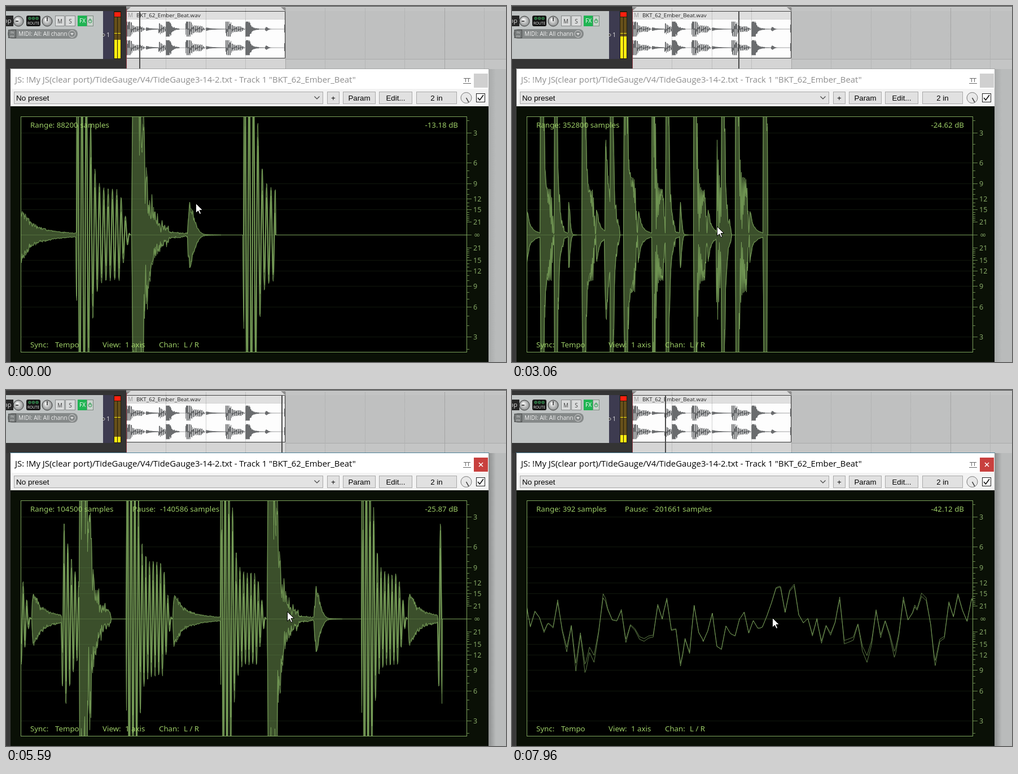
An HTML page with a canvas that plays this animation: 886x632 px, repeating every 8 s.

```html
<!DOCTYPE html>
<html lang="en">
<head>
<meta charset="utf-8">
<title>Waveform scope</title>
<style>
html, body { margin: 0; width: 100%; height: 100%; overflow: hidden; background: #bfc0c0; }
canvas { display: block; width: 886px; height: 632px; }
</style>
</head>
<body>
<canvas id="stage" width="886" height="632"></canvas>
<script>
const g = document.getElementById('stage').getContext('2d');
const TAU = Math.PI * 2;
const LOOP = 88200, BEAT = LOOP / 8;
const PAUSE_AT = 4150, PAUSE_END = 239398;
const CLIP = { name: 'BKT_62_Ember_Beat', x: 213, w: 282 };
const PLOT = { x: 26, y: 196, w: 790, h: 419, mid: 406, full: 255.4 };
const SANS = '"Noto Sans", sans-serif', UI = '"Open Sans", sans-serif', ARIAL = '"Liberation Sans", sans-serif';
const LINE = '#7ca45c', GREEN = '#9ccc66', SCALE = '#86a866', TICK = '#66854b';

// ---------- helpers ----------
const clamp = (v, a, b) => Math.max(a, Math.min(b, v));
const mix = (a, b, p) => a + (b - a) * p;

function rng(seed) {
  return () => {
    seed = (seed + 0x6D2B79F5) | 0;
    let r = Math.imul(seed ^ (seed >>> 15), 1 | seed);
    r = (r + Math.imul(r ^ (r >>> 7), 61 | r)) ^ r;
    return ((r ^ (r >>> 14)) >>> 0) / 4294967296;
  };
}

// Keys on both sides of time t, and the progress between them
function between(keys, t) {
  const next = keys.findIndex(k => t <= k.t);
  const i = next < 0 ? keys.length - 1 : next;
  const b = keys[i], a = keys[Math.max(0, i - 1)];
  return { a, b, p: b.t > a.t ? clamp((t - a.t) / (b.t - a.t), 0, 1) : 1 };
}

function rect(x, y, w, h, fill) {
  g.fillStyle = fill;
  g.fillRect(x, y, w, h);
}

function box(x, y, w, h, fill, stroke) {
  rect(x, y, w, h, fill);
  g.strokeStyle = stroke;
  g.lineWidth = 1;
  g.strokeRect(x + .5, y + .5, w - 1, h - 1);
}

function pill(x, y, w, h, r, fill) {
  g.beginPath();
  g.roundRect(x, y, w, h, r);
  g.fillStyle = fill;
  g.fill();
}

function text(s, x, y, size, fill, font = SANS, align = 'left') {
  g.font = size + 'px ' + font;
  g.textAlign = align;
  g.fillStyle = fill;
  g.fillText(s, x, y);
}

function path(points, stroke, width = 1, fill) {
  g.beginPath();
  for (let i = 0; i < points.length; i += 2) g.lineTo(points[i], points[i + 1]);
  if (fill) { g.closePath(); g.fillStyle = fill; g.fill(); }
  if (stroke) { g.strokeStyle = stroke; g.lineWidth = width; g.stroke(); }
}

function disc(x, y, r, fill, stroke) {
  g.beginPath();
  g.arc(x, y, r, 0, TAU);
  if (fill) { g.fillStyle = fill; g.fill(); }
  if (stroke) { g.strokeStyle = stroke; g.lineWidth = 1; g.stroke(); }
}

// ---------- drum loop, amplitudes in scope pixels ----------
const rand = rng(41);

// Random knots joined by lines, one every `step` samples
function noise(step, lo, hi) {
  const knots = Array.from({ length: LOOP / step + 2 }, () => mix(lo, hi, rand()));
  return i => {
    const k = Math.floor(i / step);
    return mix(knots[k], knots[k + 1], i / step - k);
  };
}

const hiss = noise(4, -1, 1), rumble = noise(17, -1, 1), swell = noise(60, .5, 1.2);
const left = new Float32Array(LOOP), right = new Float32Array(LOOP);

function add(start, len, fn) {
  for (let n = 0; n < len && start + n < LOOP; n++) left[start + n] += fn(n, start + n);
}

function kick(start, tail) {
  add(start, BEAT, (n, i) => {
    const fade = clamp((10600 - n) / 2100, 0, 1);
    const amp = tail * fade + 270 / (1 + (n / 2700) ** 6);
    return amp * Math.sin(TAU * n / 861 - .25) + (130 * Math.exp(-n / 700) + 6 * fade) * hiss(i);
  });
}

function snare(start, end) {
  add(start, end, (n, i) => {
    const amp = 350 / (1 + (n / 2450) ** 4) + (n < 7200 ? 10 : 3);
    const tone = .25 * Math.sin(TAU * n / 137);
    return amp * (tone + swell(i) * (.6 * rumble(i) + .65 * hiss(i)));
  });
}

function hat(start, len) {
  add(start, len, (n, i) => {
    const amp = 38 * Math.exp(-n / 1600) + 20 * Math.exp(-n / 6500);
    return amp * Math.min(1, .5 + n / 300) * hiss(i) * mix(1, swell(i), .4);
  });
}

function shortHat(start) {
  add(start, 6500, (n, i) => {
    const amp = 62 * Math.exp(-((n / 1550) ** 2)) + 3 * Math.exp(-n / 2500);
    return amp * Math.min(1, .5 + n / 800) * hiss(i) * mix(1, swell(i), .4);
  });
}

function tom(start) {
  add(start, 4300, n => 205 * Math.exp(-n / 3700) * Math.min(1, n / 500) * Math.cos(TAU * (n - 722) / 861));
}

hat(0, BEAT);
kick(BEAT, 75);
snare(BEAT * 2, BEAT);
shortHat(BEAT * 3);
kick(BEAT * 4, 75);
hat(BEAT * 5, 6725);
tom(61850);
snare(BEAT * 6, 7400);
kick(BEAT * 7, 95);
for (let i = 0; i < LOOP; i++) right[i] = left[i] * (.92 + .08 * Math.sin(i / 40));

// ---------- state over time ----------
const LATE = [23, 35, 37, 43];
const ticks = [0];
for (let k = 1; k <= 44; k++) ticks.push(ticks[k - 1] + (LATE.includes(k) ? 190 : 180));

const ZOOM = [
  { t: 5050, r: 352800, l: 0 },
  { t: 5590, r: 104500, l: 140586 },
  { t: 6130, r: 19882, l: 191079 },
  { t: 6500, r: 19882, l: 191079 },
  { t: 7050, r: 5430, l: 198914 },
  { t: 7960, r: 392, l: 201661 }
];
const MOUSE = [
  { t: 0, x: 336, y: 350 },
  { t: 1080, x: 338, y: 382 },
  { t: 2800, x: 338, y: 382 },
  { t: 3960, x: 449, y: 421 },
  { t: 4510, x: 449, y: 421 },
  { t: 5230, x: 498, y: 393 },
  { t: 6130, x: 498, y: 393 },
  { t: 6500, x: 456, y: 399 },
  { t: 7050, x: 456, y: 399 },
  { t: 7960, x: 461, y: 404 }
];
const HITS = [0, .209, .25, .375, .625, .75];

// The range shrinks exponentially around a fixed sample
function view(t) {
  if (t < 900) return { r: t < 540 ? LOOP : LOOP * 2, l: 0 };
  const { a, b, p } = between(ZOOM, t);
  if (a.r === b.r) return b;
  const r = a.r * Math.pow(b.r / a.r, p);
  return { r: Math.round(r), l: Math.round(mix(a.l, b.l, (a.r - r) / (a.r - b.r))) };
}

function mouseAt(t) {
  const { a, b, p } = between(MOUSE, t);
  return { x: Math.round(mix(a.x, b.x, p)), y: Math.round(mix(a.y, b.y, p)) };
}

// ---------- arranger ----------
function knob(x, y, r, tx, ty) {
  const grad = g.createRadialGradient(x - 2, y - 3, 1, x, y, r);
  grad.addColorStop(0, '#f4f4f4');
  grad.addColorStop(1, '#8d9090');
  disc(x, y, r, grad, '#3c3c3c');
  path([x, y, x + tx, y + ty], '#222', 1.5);
}

function meter(phase) {
  const since = Math.min(...HITS.map(h => (phase - h + 1) % 1));
  const top = Math.round(47 + 160 * since);
  rect(191, 9, 13, 85, '#241d0c');
  rect(192, 11, 11, 8, '#ff2010');
  for (const x of [192, 198]) {
    rect(x, 20, 5, 73, '#66501a');
    rect(x, top, 5, 93 - top, '#ffee10');
    rect(x, 48, 5, 1, '#ffee10');
  }
}

function trackPanel(phase) {
  rect(0, 0, 213, 632, '#343434');
  rect(0, 9, 172, 85, '#c0c4c4');
  rect(0, 17, 13, 19, '#262626');
  text('op', -4, 30, 11, '#e4e4e4', UI);
  knob(22, 27, 9, -5, 0);
  pill(36, 17, 25, 19, 3, '#151515');
  for (const x of [42, 48.5, 55]) disc(x, 22, 2.3, '#1c5a30', '#3f8a55');
  text('ROUTE', 48.5, 33, 6.5, '#eee', UI, 'center');
  knob(73, 27, 9, 0, -7);
  box(87, 17, 17, 19, '#d9dbdb', '#858888');
  box(105, 17, 18, 19, '#d9dbdb', '#858888');
  text('M', 95.5, 31, 10, '#444', UI, 'center');
  text('S', 114, 31, 10, '#444', UI, 'center');
  rect(127, 17, 17, 19, '#1fb452');
  text('FX', 135.5, 30, 10, '#fff', UI, 'center');
  box(143, 17, 12, 19, '#c9d3cc', '#7d8a80');
  disc(149, 27, 3, null, '#249a4a');
  path([149, 22, 149, 27], '#249a4a');
  pill(3, 41, 124, 17, 8, '#858989');
  box(4, 42, 14, 15, '#777b7b', '#4b4d4d');
  text('IN', 11, 49, 6, '#ddd', UI, 'center');
  text('FX', 11, 56, 6, '#ddd', UI, 'center');
  text('MIDI: All: All chann', 22, 53, 10, '#f2f2f2', UI);
  disc(117, 49.5, 6, '#858989', '#d5d5d5');
  path([114, 48, 120, 48, 117, 52], null, 1, '#ddd');
  rect(172, 9, 19, 85, '#3d3b50');
  disc(173, 51.5, 2, '#222', '#ddd');
  text('1', 181, 55, 10, '#eee', UI, 'center');
  meter(phase);
}

function clipLane(mid) {
  const step = LOOP / CLIP.w;
  const y = v => clamp(v / 17, -13, 13);
  for (let i = 0; i < CLIP.w - 1; i++) {
    let lo = 0, hi = 0;
    for (let k = i * step | 0; k < (i + 1) * step; k++) {
      const v = left[(k + LOOP / 2) % LOOP];
      lo = Math.min(lo, v);
      hi = Math.max(hi, v);
    }
    rect(CLIP.x + i, mid - y(hi) - .3, 1, y(hi) - y(lo) + .6, '#6a6c6e');
  }
  rect(493, mid - 8, 1, 14, '#6a6c6e');
}

function arranger(phase) {
  const { x, w, name } = CLIP, end = x + w;
  rect(x, 0, 673, 632, '#bfc0c0');
  rect(x, 0, 673, 9, '#c3c4c4');
  rect(x, 0, w, 9, '#dadada');
  rect(x, 94, 673, 18, '#c4c5c5');
  rect(x, 94, w, 18, '#d5d5d5');
  rect(end, 94, 391, 1, '#a9aaaa');
  rect(0, 0, 886, 1, '#4a4a4a');
  rect(x, 9, w, 84, '#fdfdfd');
  rect(x, 9, w, 14, '#dfdfdf');
  clipLane(41);
  clipLane(74);
  g.setLineDash([1, 1]);
  for (let i = 1; i < 10; i++) {
    const gx = Math.round(x - .5 + i * w / 4) + .5;
    path([gx, 4, gx, 111], i % 4 ? '#a6a7a7' : '#888');
  }
  path([x, 23.5, end, 23.5], '#aaa');
  g.setLineDash([]);
  path([x, 9.5, end - .5, 9.5, end - .5, 92.5, x, 92.5], '#444');
  path([x, 2, x + 8, 2, x, 9], null, 1, '#8c8c8c');
  path([end, 2, end - 8, 2, end, 9], null, 1, '#8c8c8c');
  text('M', 216, 20, 10, '#999', UI);
  text(name + '.wav', 231, 20, 9.8, '#222', UI);
  path([x + .5, 5, x + .5, 112], '#8c3540');
  rect(Math.round(x - .3 + phase * w), 9, 2, 103, '#4a4a4a');
}

// ---------- plug-in window ----------
function button(label, x, w) {
  box(x, 152, w, 22, '#e1e1e1', '#a9a9a9');
  text(label, x + w / 2, 167.5, 13.3, '#000', ARIAL, 'center');
}

function titleBar(active) {
  rect(7, 111, 849, 1, active ? '#4d8299' : '#a4a6a6');
  rect(8, 112, 847, 66, '#fff');
  text('JS: !My JS(clear port)/TideGauge/V4/TideGauge3-14-2.txt - Track 1 "' + CLIP.name + '"',
    16, 136, 14.9, active ? '#000' : '#8d8d8d', UI);
  path([811, 128.5, 823, 128.5], '#666');
  path([814.5, 129, 814.5, 135], '#666');
  path([819.5, 129, 819.5, 135], '#666');
  path([810, 137.5, 824, 137.5], '#666');
  rect(829, 120, 25, 25, active ? '#c8403e' : '#d0d0d0');
  if (active) {
    path([838, 129, 845, 136], '#fff', 1.5);
    path([845, 129, 838, 136], '#fff', 1.5);
  }
}

function toolbar() {
  rect(8, 147, 847, 31, '#f3f3f3');
  box(14, 152, 548, 22, '#e3e3e3', '#a9a9a9');
  text('No preset', 18, 168, 13.5, '#000', ARIAL);
  path([546.5, 160.5, 551, 165, 555.5, 160.5], '#444', 1.2);
  button('+', 569, 22);
  button('Param', 597, 58);
  button('Edit...', 661, 59);
  button('2 in', 727, 72);
  disc(815.5, 163, 9.5, '#e8e8e8', '#777');
  path([815.5, 163, 820, 171], '#333', 1.5);
  box(833, 155, 16, 16, '#fff', '#222');
  path([836, 163, 839.5, 167, 846, 158], '#111', 1.6);
}

function windowFrame(active) {
  const shade = g.createLinearGradient(855, 0, 868, 0);
  shade.addColorStop(0, active ? '#8c8e8e' : '#a8aaaa');
  shade.addColorStop(1, '#b9bbbb');
  rect(855, 112, 31, 520, shade);
  rect(0, 112, 8, 520, '#3a3a3a');
  titleBar(active);
  toolbar();
  rect(8, 178, 847, 454, '#0a1006');
}

function scale() {
  const { x, y, w, h, mid, full } = PLOT;
  const labels = [3, 6, 9, 12, 15, 21];
  rect(x, y, w, h, '#000');
  for (let db = 2; db <= 21; db++) {
    const named = labels.includes(db);
    for (const side of [-1, 1]) {
      const ty = Math.round(mid + side * full * Math.pow(10, -db / 20));
      if (named && db < 21) rect(x, ty, w, 1, '#10170c');
      rect(x + w, ty, named ? 9 : 5, 1, TICK);
      if (named) text(db, 828, ty + 5, 12.5, SCALE);
    }
  }
  rect(x + w, mid, 9, 1, TICK);
  text('∞', 829, mid + 5, 14, SCALE, '"DejaVu Sans", sans-serif');
  rect(x, mid, w, 1, '#2c3c20');
}

function trace(buf, v, end) {
  const { x, w, mid } = PLOT, step = v.r / w;
  const at = k => k < end ? buf[k % LOOP] : 0;
  const top = [], low = [];
  if (step < 1) {
    for (let k = 0; k <= v.r + 1; k++) top.push(x + k / step + .5, mid + .5 - at(v.l + k));
    path(top, LINE);
    return;
  }
  for (let i = 0; i <= w; i++) {
    const from = Math.floor(v.l + i * step), to = Math.floor(v.l + (i + 1) * step);
    let lo = Infinity, hi = -Infinity;
    for (let k = from; k <= to; k++) {
      const s = at(k);
      if (s < lo) lo = s;
      if (s > hi) hi = s;
    }
    top.push(x + i + .5, mid + .5 - hi);
    low.push(x + i + .5, mid + .5 - lo);
  }
  const outline = top.slice();
  for (let i = low.length - 2; i >= 0; i -= 2) outline.push(low[i], low[i + 1]);
  path(outline, null, 1, 'rgba(124,164,92,.37)');
  path(top, LINE);
  path(low, LINE);
}

function labels(v, paused, mouse) {
  const label = (s, x, y, align) => text(s, x, y, 13.3, GREEN, SANS, align);
  label('Range: ' + v.r + ' samples', 43, 216);
  if (paused) {
    const x = 176 + 8 * String(v.r).length;
    label(v.l ? 'Pause:' : 'Pause', x, 216);
    if (v.l) label('-' + v.l + ' samples', x + 49, 216);
  }
  const level = Math.max(1, Math.abs(PLOT.mid - mouse.y)) / PLOT.full;
  label((20 * Math.log10(level)).toFixed(2) + ' dB', 801, 216, 'right');
  label('Sync:', 43, 606);
  label('Tempo', 87, 606);
  label('View:', 171, 606);
  label('1 axis', 211, 606);
  label('Chan:', 271, 606);
  label('L / R', 315, 606);
}

function scope(t, mouse) {
  const { x, y, w, h } = PLOT;
  const v = view(t);
  const end = Math.min(PAUSE_END, (.572 + t * 5.181e-4) * LOOP);
  scale();
  g.save();
  g.beginPath();
  g.rect(x, y, w, h);
  g.clip();
  g.lineJoin = 'bevel';
  g.globalAlpha = .75;
  trace(right, v, end);
  trace(left, v, end);
  g.restore();
  g.strokeStyle = LINE;
  g.lineWidth = 1;
  g.strokeRect(x + .5, y + .5, w, h - 1);
  labels(v, t >= PAUSE_AT, mouse);
}

function cursor({ x, y }) {
  const shape = [0, 0, 0, 17, 4, 13.2, 6.7, 19, 9.2, 18, 6.6, 12, 12, 12];
  path(shape.map((p, i) => p + (i % 2 ? y : x) + .5), '#000', 1, '#fff');
}

function draw(t) {
  const phase = ((23 + t * .1461) / CLIP.w) % 1;
  const mouse = mouseAt(t);
  trackPanel(phase);
  arranger(phase);
  windowFrame(t >= PAUSE_AT);
  scope(t, mouse);
  cursor(mouse);
}

let shown = -1;
const begin = performance.now();
function frame() {
  const now = (performance.now() - begin) % 8000;
  const t = ticks.filter(k => k <= now).pop() || 0;
  if (t !== shown) draw(shown = t);
  requestAnimationFrame(frame);
}
draw(shown = 0);
requestAnimationFrame(frame);
</script>
</body>
</html>
```
